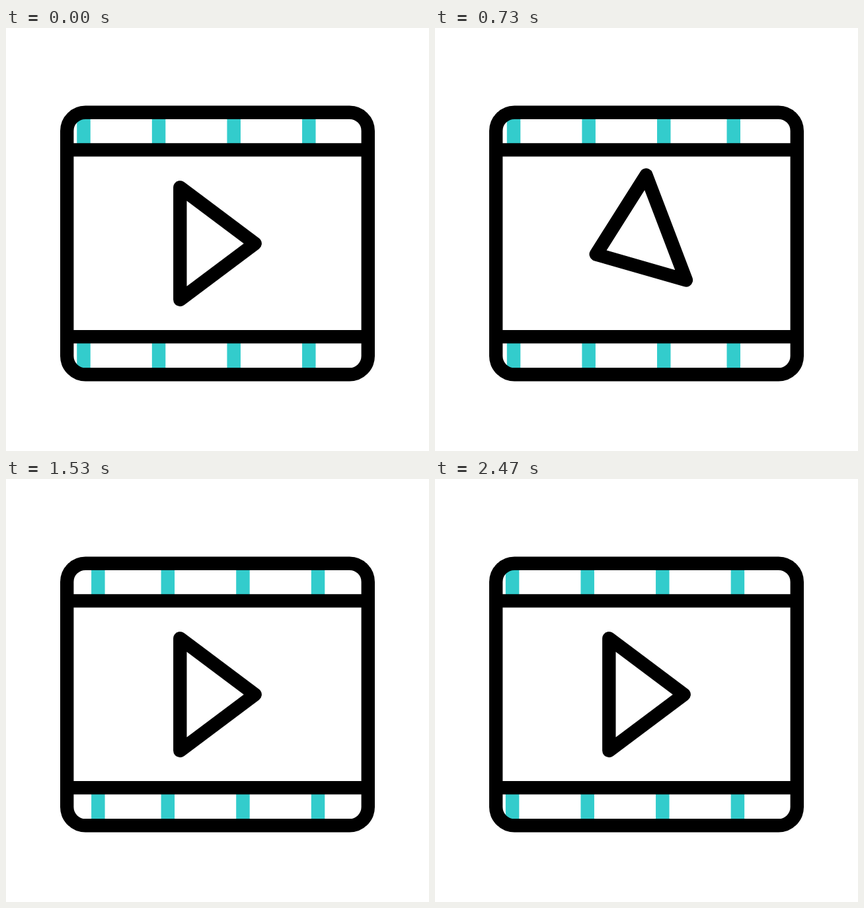
An HTML page for the animation above (2.5 s loop, 640 by 640 pixels).

```html
<!DOCTYPE html>
<html lang="en">
<head>
<meta charset="utf-8">
<title>Film clip icon</title>
<style>
  html, body { margin: 0; width: 100%; height: 100%; overflow: hidden; background: #fff; }
  svg { display: block; width: 100%; height: 100%; }
  .ink { fill: none; stroke: #000; stroke-width: 20.4; stroke-linejoin: round; }
  #strip { stroke: #3cc; stroke-width: 20.5; }
</style>
</head>
<body>
<svg viewBox="0 0 640 640">
  <clipPath id="window">
    <rect x="92.2" y="127.7" width="455.6" height="396.6" rx="28"/>
  </clipPath>
  <g clip-path="url(#window)"><path id="strip"/></g>
  <g class="ink">
    <rect x="92.2" y="127.7" width="455.6" height="396.6" rx="28"/>
    <path d="M92 184.4H548M92 467.1H548"/>
    <path id="play" d="M263.3 241.1V411.1L376.7 326.1Z"/>
  </g>
</svg>
<script>
  const LOOP = 2500;
  const START = 9;          // ticks are 1/30 s
  const TURN = 32;          // ticks for one full turn
  const SPEED = 8.62;       // strip travel per tick
  const GAP = 113.6;
  const PIVOT = "308.7 322";

  const strip = document.getElementById("strip");
  const play = document.getElementById("play");

  // The second run of bars follows the first a little closer.
  let bars = "";
  for (const first of [117.5, 563.8]) {
    const count = first < 200 ? 4 : 5;
    for (let i = 0; i < count; i++) {
      const x = first + i * GAP;
      bars += `M${x} 128V184M${x} 467V524`;
    }
  }
  strip.setAttribute("d", bars);

  const bezier = (s, a, b) => 3 * (1 - s) * (1 - s) * s * a + 3 * (1 - s) * s * s * b + s * s * s;

  function ease(x) {
    let lo = 0, hi = 1;
    for (let i = 0; i < 30; i++) {
      const mid = (lo + hi) / 2;
      if (bezier(mid, 0.416, 0.41) < x) lo = mid; else hi = mid;
    }
    return bezier(lo, 0, 1);
  }

  function draw(time) {
    const tick = Math.floor((Math.floor(time / 10) + 0.34) * 0.3);
    const n = Math.max(0, tick - START);
    const angle = n > 0 && n < TURN ? 360 * ease(n / TURN) : 0;
    strip.setAttribute("transform", `translate(${-SPEED * n} 0)`);
    play.setAttribute("transform", `rotate(${angle} ${PIVOT})`);
  }

  const begin = performance.now();
  function loop() {
    draw((performance.now() - begin) % LOOP);
    requestAnimationFrame(loop);
  }
  loop();
</script>
</body>
</html>
```
